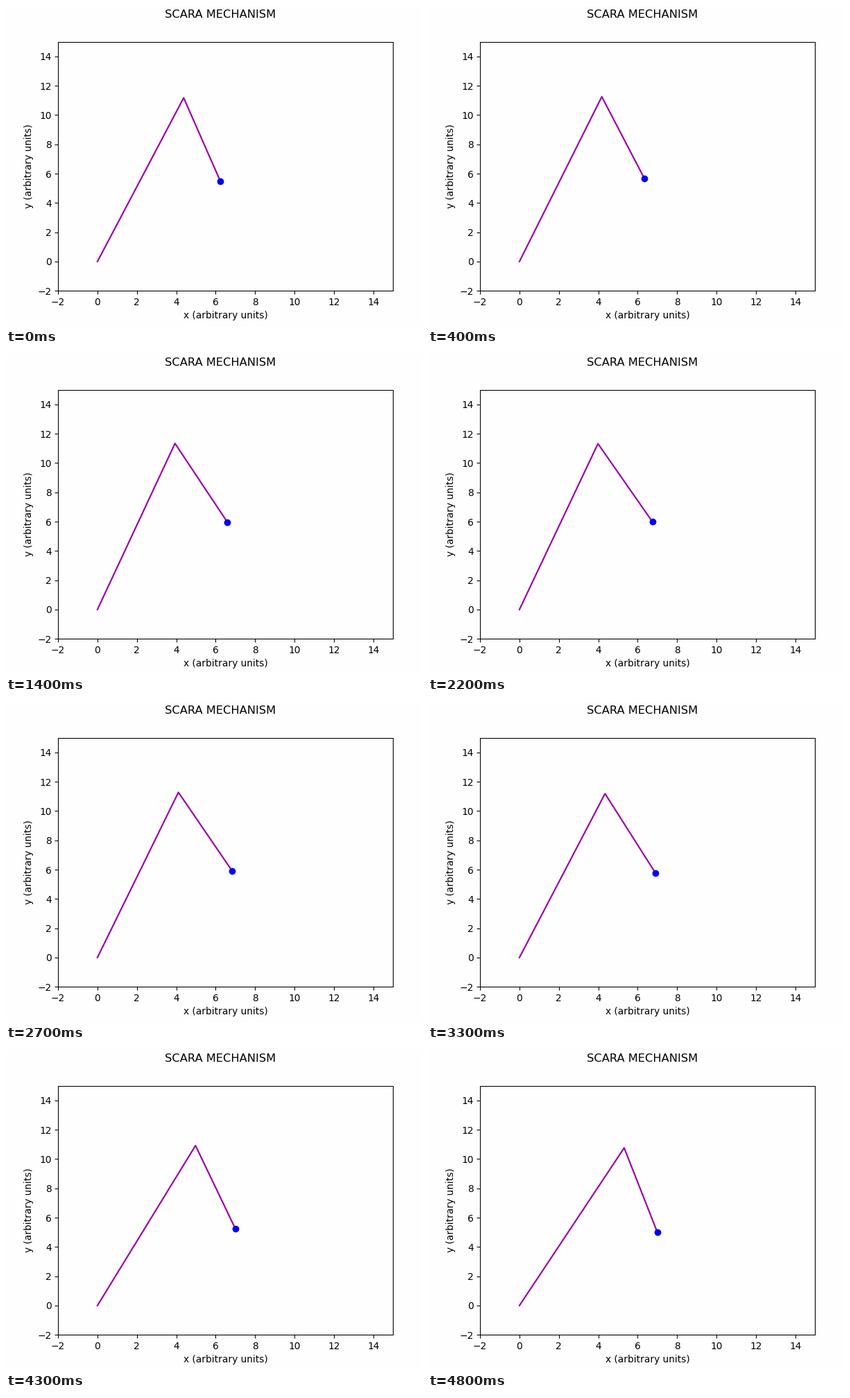
A matplotlib script that plays this animation: 600 by 462 pixels, repeating every 5 s.

```python
import numpy as np
import matplotlib.pyplot as plt
from matplotlib.animation import FuncAnimation

WIDTH, HEIGHT, DPI = 600, 462, 97.5
LEFT, RIGHT, TOP, BOTTOM = 75, 558.2, 51.6, 411.3   # axes edges in pixels
FRAMES, INTERVAL = 50, 100
UPPER, FORE = 12, 6                        # link lengths
HELD = {37, 38, 40, 44, 46, 47, 49}        # frames that repeat the previous pose
KEY_FRAMES = [0, 7, 14, 22, 33, 39, 48]
KEY_PHASES = [0.245, 0.44, 0.64, 0.846, 1.138, 1.328, np.pi / 2]
PAPER = "#fefefe"

plt.rcParams.update({"font.family": "DejaVu Sans", "font.size": 10.15})

# The tiny margin keeps the pixel size from rounding down.
fig = plt.figure(figsize=((WIDTH + 1e-6) / DPI, (HEIGHT + 1e-6) / DPI),
                 dpi=DPI, facecolor=PAPER)
ax = fig.add_axes([LEFT / WIDTH, 1 - BOTTOM / HEIGHT,
                   (RIGHT - LEFT) / WIDTH, (BOTTOM - TOP) / HEIGHT],
                  facecolor=PAPER)
ax.set(xlim=(-2, 15), ylim=(-2, 15),
       xticks=range(-2, 15, 2), yticks=range(-2, 15, 2),
       xlabel="x (arbitrary units)", ylabel="y (arbitrary units)")
fig.text(309 / WIDTH, 1 - 4.9 / HEIGHT, "SCARA MECHANISM",
         size=12, ha="center", va="top")

arm, = ax.plot([], [], color="#9a00a6", lw=1.6)
tip, = ax.plot([], [], "o", color="#0000f4", ms=6.2)


def tip_position(phase):
    """Point on a figure-eight path."""
    return 6 + np.sin(phase), 5 + np.sin(2 * phase)


def elbow_position(x, y):
    """Inverse kinematics, elbow-up solution."""
    reach = np.hypot(x, y)
    cos_bend = (UPPER**2 + reach**2 - FORE**2) / (2 * UPPER * reach)
    angle = np.arctan2(y, x) + np.arccos(cos_bend)
    return UPPER * np.cos(angle), UPPER * np.sin(angle)


def draw(frame):
    while frame in HELD:
        frame -= 1
    x, y = tip_position(np.interp(frame, KEY_FRAMES, KEY_PHASES))
    elbow_x, elbow_y = elbow_position(x, y)
    arm.set_data([0, elbow_x, x], [0, elbow_y, y])
    tip.set_data([x], [y])
    return arm, tip


animation = FuncAnimation(fig, draw, frames=FRAMES, interval=INTERVAL,
                          repeat=True, repeat_delay=0)
plt.show()
```
